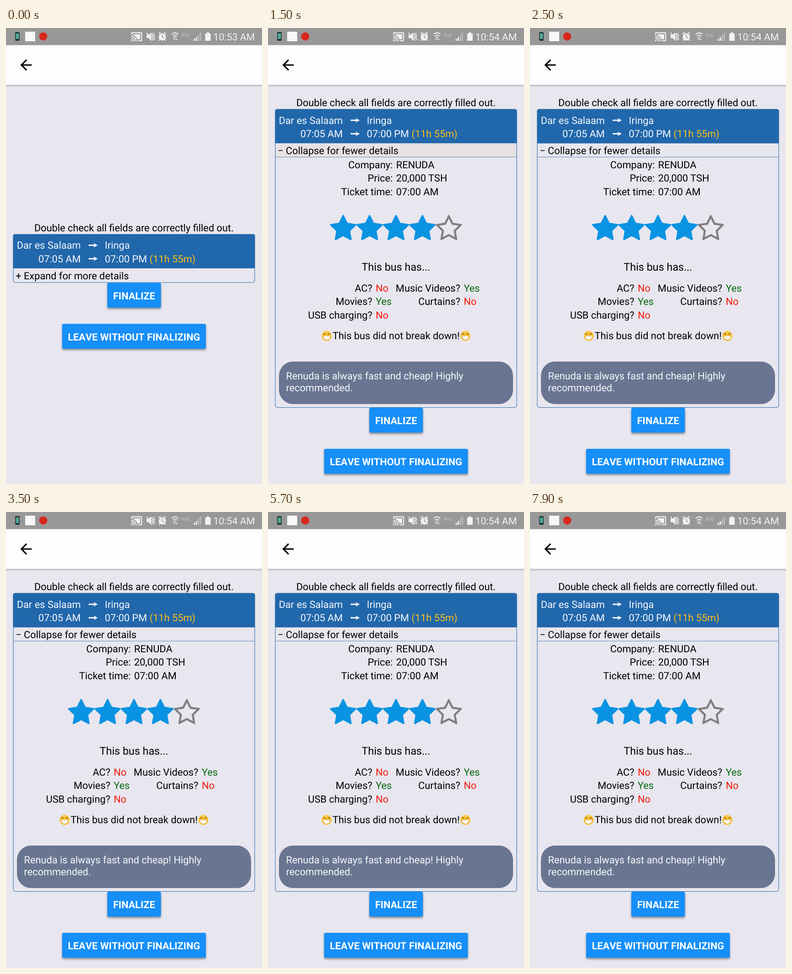
An HTML page for the animation above (8000 ms loop, 561 px wide and 998 px high).

```html
<!DOCTYPE html>
<html lang="en">
<head>
<meta charset="utf-8">
<title>Trip review</title>
<style>
  html, body { margin: 0; width: 100%; height: 100%; overflow: hidden; background: #e8e6ef; }
  svg { display: block; width: 100%; height: 100%; }
  text { font: 21.82px Roboto, sans-serif; text-rendering: geometricPrecision; white-space: pre; }
  .end { text-anchor: end; }
  .mid { text-anchor: middle; }
  .light { fill: #f5f8fd; }
  .yes { fill: #04690c; }
  .no { fill: #f51b0c; }
  .line { fill: none; stroke: #f2f2f2; stroke-width: 1.7; }
  .button rect { fill: #168ff8; filter: drop-shadow(0 3px 2px #0006); }
  .button text { font-weight: 700; font-kerning: none; fill: #fff; text-anchor: middle; }
</style>
</head>
<body>
<svg viewBox="0 0 561 998">
  <defs>
    <path id="arrow" d="M0-1.5H12.5L11-5 20 0 11 5l1.5-3.5H0z" fill="#f5f8fd"/>
    <g id="grin">
      <circle r="11" fill="#fcc63b"/>
      <path d="M-7.5-3q2.5-4.5 5 0M2.5-3q2.5-4.5 5 0" fill="none" stroke="#75501f" stroke-width="1.4"/>
      <path d="M-8 0H8Q7 8.500 0 8.500T-8 0z" fill="#fff" stroke="#b98a35" stroke-width=".7"/>
      <path d="M-7.5 4H7.5" stroke="#d5cbb8" stroke-width=".6"/>
    </g>
    <linearGradient id="shade" x2="0" y2="1">
      <stop stop-color="#a9a8ae"/><stop offset="1" stop-color="#e8e6ef"/>
    </linearGradient>
  </defs>

  <rect width="561" height="998" fill="#e8e6ef"/>
  <rect y="124" width="561" height="5" fill="url(#shade)"/>
  <rect y="37" width="561" height="87.5" fill="#fdfcff"/>
  <path transform="translate(25.3 62.3) scale(1.558)" d="M20 11H7.83l5.59-5.59L12 4l-8 8 8 8 1.41-1.41L7.83 13H20z"/>

  <!-- Status bar -->
  <rect width="561" height="37.5" fill="#999899"/>
  <rect x="20" y="9" width="10" height="19" rx="2" fill="#24352f"/>
  <rect x="21.5" y="12" width="7" height="12" fill="#4fa79b"/>
  <rect x="42" y="8" width="22" height="21" fill="#f7f7f7"/>
  <circle cx="81.5" cy="18.5" r="9" fill="#d8281d"/>
  <g fill="#f2f2f2">
    <path transform="translate(273 6) scale(1.1)" d="M1 18v3h3c0-1.66-1.34-3-3-3zm0-4v2c2.76 0 5 2.24 5 5h2c0-3.87-3.13-7-7-7zm0-4v2c4.97 0 9 4.03 9 9h2c0-6.08-4.93-11-11-11zM21 3H3c-1.1 0-2 .9-2 2v3h2V5h18v14h-7v2h7c1.1 0 2-.9 2-2V5c0-1.1-.9-2-2-2zM19 7H5v1.63c3.96 1.28 7.09 4.41 8.37 8.37H19z"/>
    <path d="M308 15h4l6-5v17l-6-5h-4z"/>
    <path class="line" d="M308 10l11 17M321 11l-2 3 3 3-3 3 3 3-2 4M325 11l-2 3 3 3-3 3 3 3-2 4"/>
    <circle cx="342.5" cy="19.5" r="8"/>
    <path class="line" d="M334 13l5-4M346 9l5 4M337 25l-2 3M348 25l2 3"/>
    <path d="M342.5 14v6l4 2" fill="none" stroke="#999899" stroke-width="1.7"/>
    <path class="line" d="M363 14q7.500-7 15 0M365.500 18q5-5 10 0M368 21q2.500-2 5 0"/>
    <path d="M366 25l2.500-3 2.500 3zM371 24h5l-2.500 3z"/>
    <text x="384" y="19" style="font-size:10.5px" fill="#c4c3c4" font-style="italic">4GE</text>
    <path d="M411 24h3v4h-3zM415.500 20h3v8h-3z"/>
    <path d="M420 15.500h3V28h-3zM424.500 10h3V28h-3z" fill="#bdbcbd"/>
    <path d="M440 9.500h5V12h3.500V28H436.500V12h3.500z"/>
    <text id="clock" x="545.4" y="27" class="end" style="font-size:21.4px"></text>
  </g>

  <!-- Trip card heading, shifted up when open -->
  <g id="heading">
    <text x="280.5" y="444.5" class="mid">Double check all fields are correctly filled out.</text>
    <path d="M15.5 526V455q0-4 4-4H541.5q4 0 4 4V526z" fill="#2167ab"/>
    <g class="light">
      <text x="163.9" y="483" class="end">Dar es Salaam</text>
      <text x="216.6" y="483">Iringa</text>
      <text x="163.9" y="512.5" class="end">07:05 AM</text>
      <text x="216.6" y="512.5">07:00 PM <tspan fill="#fdc015">(11h 55m)</tspan></text>
    </g>
    <use href="#arrow" x="181" y="475.5"/>
    <use href="#arrow" x="181" y="505"/>
    <rect id="press" x="16" y="526" width="529" height="30" fill="#e7e2e3"/>
    <text id="toggle" x="21.2" y="549.8"></text>
  </g>
  <rect id="frame" x="16" width="529" rx="5" fill="none" stroke="#2f70ae" stroke-width="1.1"/>

  <g id="details">
    <path d="M16 282.5H545" stroke="#5b8cbc"/>
    <g class="end">
      <text x="273.3" y="306.5">Company:</text>
      <text x="273.3" y="336">Price:</text>
      <text x="273.3" y="365.7">Ticket time:</text>
      <text x="228.5" y="576.5">AC?</text>
      <text x="228.5" y="606">Movies?</text>
      <text x="228.5" y="635.7">USB charging?</text>
      <text x="421.4" y="576.5">Music Videos?</text>
      <text x="421.4" y="606">Curtains?</text>
    </g>
    <text x="280.8" y="306.5">RENUDA</text>
    <text x="280.8" y="336">20,000 TSH</text>
    <text x="280.8" y="365.7">07:00 AM</text>
    <g id="stars" fill-rule="evenodd"></g>
    <text x="280.5" y="530.5" class="mid" style="font-size:23.37px">This bus has...</text>
    <text x="235.9" y="576.5" class="no">No</text>
    <text x="235.9" y="606" class="yes">Yes</text>
    <text x="235.9" y="635.7" class="no">No</text>
    <text x="428.9" y="576.5" class="yes">Yes</text>
    <text x="428.9" y="606" class="no">No</text>
    <use href="#grin" x="128.5" y="674"/>
    <text x="280.8" y="680.8" class="mid">This bus did not break down!</text>
    <use href="#grin" x="432.5" y="674"/>
    <rect x="24" y="730" width="513" height="93" rx="31" fill="#6a7691"/>
    <g class="light">
      <text x="39.5" y="769.3">Renuda is always fast and cheap! Highly</text>
      <text x="39.5" y="795">recommended.</text>
    </g>
  </g>

  <g id="buttons" class="button">
    <rect x="222" y="557.5" width="117.5" height="54.5" rx="3"/>
    <text x="280.7" y="593.7">FINALIZE</text>
    <rect x="123" y="647.5" width="315" height="54.5" rx="3"/>
    <text x="280.5" y="683.7">LEAVE WITHOUT FINALIZING</text>
  </g>
</svg>
<script>
  const LOOP = 8000, MINUTE_AT = 100, OPEN_AT = 1500, FADE = 400, SHIFT = 273.5;
  const STAR = 'M1728 647q0 22-26 48l-363 354 86 500q1 7 1 20 0 50-41 50-19 0-40-12l-449-236-449 236q-22 12-40 12-42 0-42-50 0-6 2-20l86-500-364-354q-25-27-25-48 0-37 56-46l502-73 225-455q19-41 49-41t49 41l225 455 502 73q56 9 56 46z';
  const HOLE = 'M1201 1004l306-297-422-62-189-382-189 382-422 62 306 297-73 421 378-199 377 199z';
  const STARS = 5, RATING = 4, STAR_PITCH = 57.87, STAR_SCALE = 0.03478;
  const el = id => document.getElementById(id);

  el('stars').innerHTML = Array.from({ length: STARS }, (_, i) => {
    const full = i < RATING;
    return `<path transform="translate(${133.6 + i * STAR_PITCH} 408) scale(${STAR_SCALE})"
      fill="${full ? '#0993e2' : '#808080'}" d="${full ? STAR : STAR + HOLE}"/>`;
  }).join('');

  function draw(t) {
    const open = t >= OPEN_AT;
    const shift = open ? SHIFT : 0;
    el('clock').textContent = t < MINUTE_AT ? '10:53 AM' : '10:54 AM';
    el('toggle').textContent = open ? '\u2212 Collapse for fewer details' : '+ Expand for more details';
    el('heading').setAttribute('transform', `translate(0 ${-shift})`);
    el('buttons').setAttribute('transform', `translate(0 ${shift})`);
    el('frame').setAttribute('y', 451.5 - shift);
    el('frame').setAttribute('height', 105.5 + 2 * shift);
    el('details').style.display = open ? '' : 'none';
    el('press').style.opacity = open ? Math.max(0, 1 - (t - OPEN_AT) / FADE) : 0;
  }

  function tick() {
    draw(performance.now() % LOOP);
    requestAnimationFrame(tick);
  }
  tick();
</script>
</body>
</html>
```
